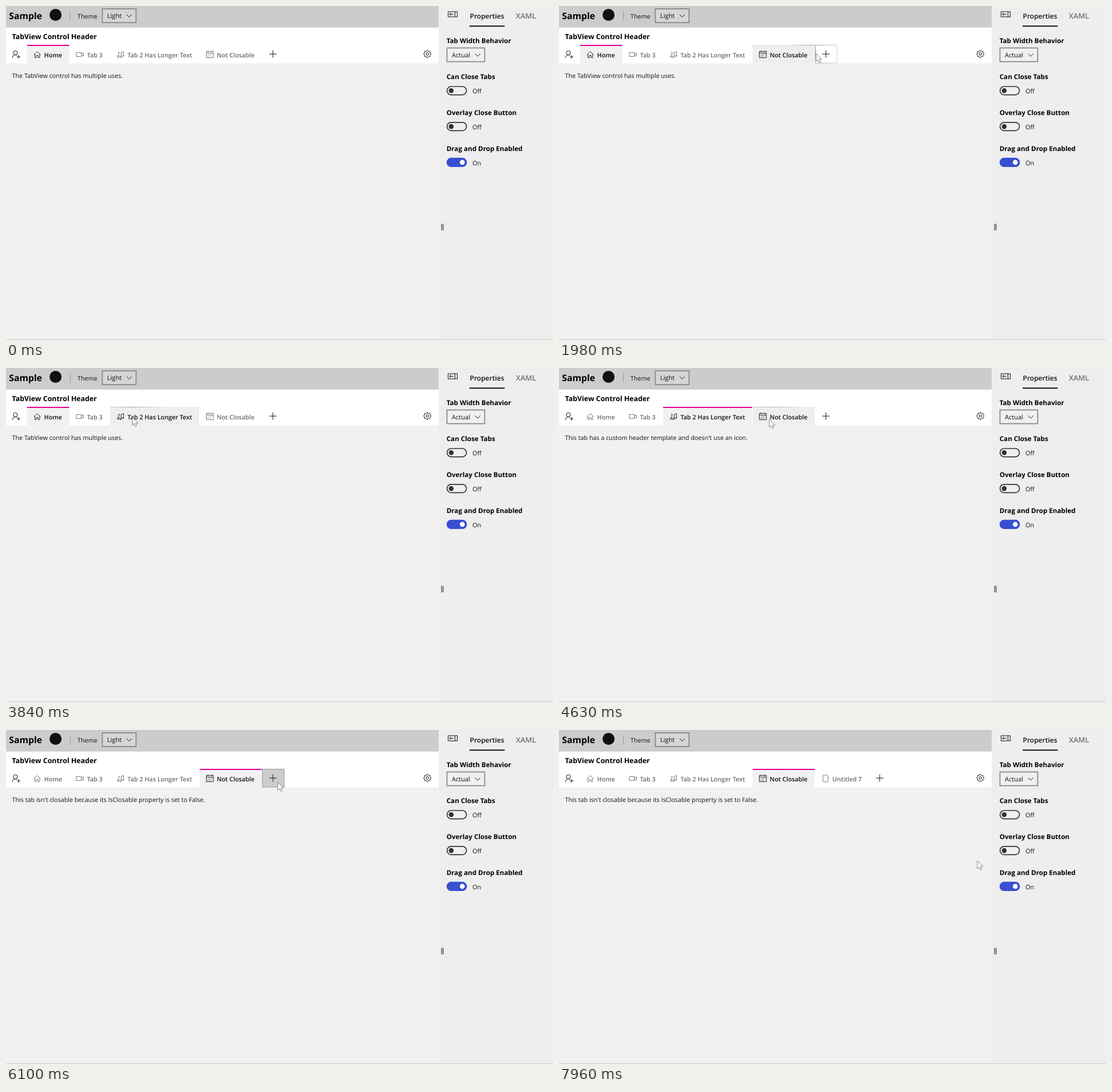
Recreate the animation shown at these times as an HTML page. Size 957 by 585 pixels, loop 8000 ms.

```html
<!DOCTYPE html>
<html lang="en">
<head>
<meta charset="utf-8">
<title>TabView sample</title>
<style>
  html, body { margin: 0; width: 100%; height: 100%; overflow: hidden; background: #eee; }
  svg { display: block; width: 100vw; height: 100vh; }
  text { font-family: "Open Sans", "Noto Sans", sans-serif; font-size: 10.8px; text-rendering: geometricPrecision; fill: #111; }
  .bold { font-weight: 700; font-size: 11.65px; fill: #000; }
  .semi { font-weight: 600; }
  .line { fill: none; stroke: #111; stroke-width: 1; }
  .tab { color: #6a6a6a; }
  .tab.on, .tab.hot { color: #111; }
  .tab text { fill: currentColor; font-weight: 600; font-size: 10.8px; }
  .tab path { fill: none; stroke: currentColor; stroke-width: .9; }
</style>
</head>
<body>
<svg viewBox="0 0 957 585" preserveAspectRatio="none">
  <defs>
    <radialGradient id="glow" gradientUnits="userSpaceOnUse" r="62">
      <stop offset="0" stop-color="#777"/>
      <stop offset=".35" stop-color="#999" stop-opacity=".7"/>
      <stop offset="1" stop-color="#aaa" stop-opacity="0"/>
    </radialGradient>
  </defs>

  <rect width="957" height="585" fill="#eee"/>
  <rect width="757" height="585" fill="#f1f1f1"/>
  <rect width="757" height="38" fill="#ccc"/>
  <rect y="37.7" width="757" height="62.8" fill="#fff"/>
  <rect y="584" width="957" height="1" fill="#c8c8c8"/>

  <!-- top bar -->
  <text class="bold" x="5.2" y="23.2" style="font-size:15.8px">Sample</text>
  <circle cx="86.7" cy="15.5" r="10.5" fill="#111"/>
  <path d="M112.5 9V25.5" stroke="#999"/>
  <text x="125" y="22">Theme</text>
  <rect x="168.5" y="5" width="59" height="24" fill="#d6d6d6" stroke="#858585" stroke-width="1.7"/>
  <text x="177" y="21.2" style="font-size:11.1px">Light</text>
  <path class="line" d="M211 15L215.5 19.5L220 15"/>

  <!-- tab strip -->
  <text class="bold" x="10.5" y="58.2" style="font-size:12.4px">TabView Control Header</text>
  <g class="line">
    <circle cx="16.4" cy="82" r="3.6"/>
    <path d="M11.3 91Q11.6 85.8 16.4 85.7Q18.3 85.7 19.4 86.8M22 86V92M19 89H25"/>
    <circle cx="737.2" cy="84" r="2.3"/>
    <path id="gear"/>
  </g>
  <g id="tabs"></g>
  <g id="plus">
    <rect x=".5" y="68.5" width="38" height="31.5" fill="none"/>
    <path class="line" d="M12.5 84.2H25.5M19 77.7V90.7" stroke-width="1.2"/>
  </g>
  <path id="edge" fill="none" stroke="url(#glow)"/>
  <text id="body" x="10.5" y="125.8" style="font-size:10.78px"></text>

  <!-- side panel -->
  <g class="line">
    <rect x="773.5" y="10" width="16" height="9"/>
    <path d="M776 14.5H783M778.5 12L776 14.5L778.5 17M785.5 10V19"/>
    <path d="M762.2 381.5V393M764.8 381.5V393"/>
    <path d="M811 35.2H872.5" stroke-width="2"/>
  </g>
  <text class="semi" x="811.5" y="22" style="font-size:12px">Properties</text>
  <text class="semi" x="892" y="22" style="font-size:12.9px;fill:#707070">XAML</text>
  <text class="bold" x="770.7" y="65.2">Tab Width Behavior</text>
  <rect x="771.5" y="73.5" width="66" height="24" fill="#f0f0f0" stroke="#858585" stroke-width="1.7"/>
  <text x="780" y="89.8" style="font-size:11.1px">Actual</text>
  <path class="line" d="M820.5 83.5L825.2 88L829.9 83.5"/>
  <g id="toggles"></g>

  <path id="cursor" d="M0 0V14L3.2 11L5.4 16L7.6 15L5.5 10.2H9.8Z" fill="#fff" stroke="#666" stroke-width=".8"/>
</svg>
<script>
const $ = id => document.getElementById(id);
const LOOP = 8000, TOP = 68, BOTTOM = 100.5;

const tabs = [
  { x: 36.8, end: 110.5, tx: 66.8, label: "Home",
    icon: "M48.8 85.5L54.7 79.8L60.6 85.5M50.5 84.2V90.4H53.2V86.6H56.2V90.4H58.9V84.2" },
  { x: 111, end: 181.5, tx: 141.8, label: "Tab 3",
    icon: "M123 81.5H131.8V88.5H123ZM131.8 83.9L135.5 82.2V87.8L131.8 86.1" },
  { x: 182, end: 338, tx: 212.5, label: "Tab 2 Has Longer Text",
    icon: "M197.3 88.6V80.5L198.9 82.4M197.3 88.6a1.4 1.4 0 1 1-2.8 0a1.4 1.4 0 1 1 2.8 0M201.4 89.4V81.2L205.7 79.8V87.6M201.4 89.4a1.3 1.3 0 1 1-2.6 0a1.3 1.3 0 1 1 2.6 0M205.7 87.6a1.3 1.3 0 1 1-2.6 0a1.3 1.3 0 1 1 2.6 0" },
  { x: 338.8, end: 447.5, tx: 368.7, label: "Not Closable",
    icon: "M350.5 79.5H362.8V90.5H350.5ZM350.5 82.4H362.8M353.3 78.2V80.5M360 78.2V80.5" +
      [[355, 84.5], [352.5, 86.5], [352.5, 88.5]].map(([x, y]) => `M${x} ${y}h1m1.5 0h1m1.5 0h1`).join("") },
  { x: 448.3, end: 541.5, tx: 478.3, label: "Untitled 7",
    icon: "M463 79H468.8L470.8 81V89.8Q470.8 90.8 469.8 90.8H462.8Q461.8 90.8 461.8 89.8V80Q461.8 79 463 79" }
];

const bodies = {
  0: "The TabView control has multiple uses.",
  2: "This tab has a custom header template and doesn't use an icon.",
  3: "This tab isn't closable because its IsClosable property is set to False."
};

// pointer stops: time, x, y
const path = [
  [130, 100, 362], [500, 95, 200], [700, 100, 88], [890, 168, 80],
  [1290, 247.5, 75], [1740, 425, 80], [1980, 450, 83], [2140, 454, 84], [2370, 454, 84],
  [2870, 222, 94], [3110, 164, 94], [3190, 153, 94], [3590, 153, 94],
  [3910, 240, 84], [4080, 248, 82], [4220, 248, 82], [4630, 368, 90], [5010, 415, 74],
  [5180, 418, 74], [5440, 418, 74], [5700, 440, 122], [6100, 475.5, 91.5], [6200, 473, 91],
  [7050, 473, 91], [7380, 505, 76], [7570, 510, 80], [7800, 690, 215], [7880, 733, 237], [7960, 732, 229]
];

function pointer(t) {
  const i = path.findIndex(p => p[0] > t);
  if (i === 0) return [-200, -200];
  if (i < 0) return path[path.length - 1].slice(1);
  const [t0, x0, y0] = path[i - 1], [t1, x1, y1] = path[i];
  const k = (t - t0) / (t1 - t0);
  return [x0 + (x1 - x0) * k, y0 + (y1 - y0) * k];
}

function build() {
  $("tabs").innerHTML = tabs.map(b => `<g class="tab">
    <rect x="${b.x}" y="${TOP}" width="${b.end - b.x}" height="${BOTTOM - TOP}"/>
    <rect x="${b.x}" y="${TOP}" width="${b.end - b.x}" height="2" fill="#e3008c"/>
    <path d="${b.icon}"/><text x="${b.tx}" y="89.6">${b.label}</text></g>`).join("");
  tabs.forEach((b, i) => {
    b.node = $("tabs").children[i];
    [b.back, b.bar] = b.node.children;
  });

  $("toggles").innerHTML = [["Can Close Tabs", 128.2], ["Overlay Close Button", 191], ["Drag and Drop Enabled", 253.8, true]]
    .map(([name, y, on]) => {
      const cy = y + 20.1;
      return `<text class="bold" x="770.7" y="${y}">${name}</text>
        <rect x="771.6" y="${cy - 7.3}" width="34" height="14.6" rx="7.3" stroke-width="1.7"
          fill="${on ? "#384fd2" : "#f0f0f0"}" stroke="${on ? "#384fd2" : "#333"}"/>
        <circle cx="${on ? 798.3 : 778.9}" cy="${cy}" r="4.3" fill="${on ? "#fff" : "#333"}"/>
        <text x="816" y="${y + 25}" style="font-size:10.9px">${on ? "On" : "Off"}</text>`;
    }).join("");

  let d = "";
  for (let i = 0; i < 32; i++) {
    const a = (i - .5) * Math.PI / 16, r = i % 4 < 2 ? 6.4 : 5;
    d += (i ? "L" : "M") + (737.2 + r * Math.cos(a)).toFixed(2) + " " + (84 + r * Math.sin(a)).toFixed(2);
  }
  $("gear").setAttribute("d", d + "Z");
}

function draw(t) {
  const [x, y] = pointer(t);
  const added = t >= 6600;
  const picked = t < 4250 ? 0 : t < 4950 ? 2 : 3;
  const inStrip = y >= TOP && y < BOTTOM;
  const plusX = added ? 542 : 448;
  // the last tab keeps its hover a little way into the add button
  const hit = i => inStrip && x >= tabs[i].x - .5 &&
    x < (i === 3 && !added ? 458 : tabs[i].end + .5);
  const plusHot = inStrip && x >= plusX + 10 && x < plusX + 39;
  let edge = "";

  tabs.forEach((b, i) => {
    const shown = i < 4 || added, on = i === picked, hot = shown && !on && hit(i);
    b.node.setAttribute("class", "tab" + (on ? " on" : hot ? " hot" : ""));
    b.node.style.display = shown ? "" : "none";
    b.back.setAttribute("fill", on ? "#f1f1f1" : hot ? "#eee" : "none");
    b.bar.style.display = on ? "" : "none";
    if (hot) edge += `M${b.x} 68.5H${b.end}`;
  });

  const nearPlus = inStrip && !plusHot && x > plusX - 45 && x < plusX + 50;
  if (nearPlus) edge += `M${plusX + .5} 68.5h38v31.5h-38z`;
  $("edge").setAttribute("d", edge || "M0 0");
  $("glow").setAttribute("cx", x);
  $("glow").setAttribute("cy", y);

  $("plus").setAttribute("transform", `translate(${plusX})`);
  const box = $("plus").firstElementChild;
  box.setAttribute("fill", plusHot ? "#ccc" : "none");
  box.setAttribute("stroke", plusHot ? "#999" : "none");

  $("body").textContent = bodies[picked];
  const visible = t >= 130 && (t < 6400 || t >= 7570);
  $("cursor").style.display = visible ? "" : "none";
  $("cursor").setAttribute("transform", `translate(${x} ${y})`);
}

build();
const start = performance.now();
function tick() {
  draw((performance.now() - start) % LOOP);
  requestAnimationFrame(tick);
}
tick();
</script>
</body>
</html>
```
